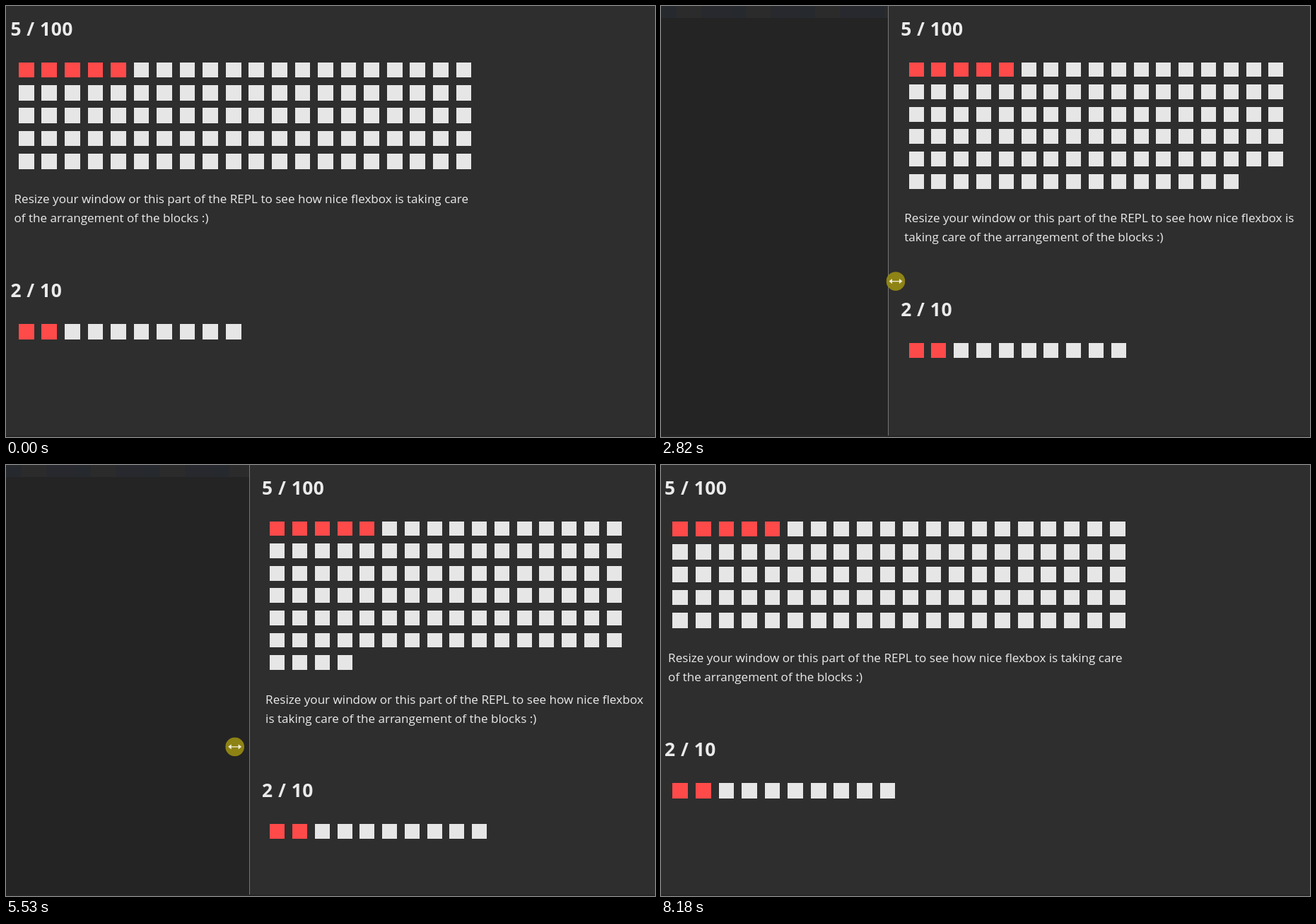
Write an HTML page that moves like this. It is 918 px wide and 610 px high and loops after 8780 ms.

```html
<!DOCTYPE html>
<html lang="en">
<head>
<meta charset="utf-8">
<title>Block counter</title>
<style>
  html, body { margin: 0; width: 100%; height: 100%; overflow: hidden; background: #2e2e2e; }
  #stage { position: relative; width: 918px; height: 610px; overflow: hidden; background: #2e2e2e;
    color: #ebebeb; font-family: "Open Sans", "Noto Sans", sans-serif; }
  #stage::after { content: ""; position: absolute; left: 0; right: 0; bottom: 0; height: 2px; background: #272727; }
  #editor { position: absolute; left: 0; top: 0; height: 610px; background: #242424; border-right: 1px solid #747474; }
  #editor::before { content: ""; display: block; height: 17px;
    background: repeating-linear-gradient(90deg, #26292d 0 22px, #2b2b2b 0 57px, #28292f 0 98px); }
  #view { position: absolute; top: 0; }
  h2 { margin: 0 0 9.2px -6px; font-size: 26.4px; line-height: 65px; letter-spacing: .5px; white-space: nowrap; }
  p { margin: 22.3px 0 57.8px -.9px; font-size: 17.08px; line-height: 27px; }
  .grid { display: flex; flex-wrap: wrap; }
  .grid i { flex: none; width: var(--size); height: var(--size); margin: 5.36px 5.45px; background: #e6e6e6; }
  .grid i.on { background: #ff4a4a; }
  #cursor { position: absolute; left: -13.5px; top: -13.5px; width: 27px; height: 27px; }
</style>
</head>
<body>
<div id="stage">
  <div id="view">
    <h2>5 / 100</h2>
    <div class="grid" data-on="5" data-all="100"></div>
    <p>Resize your window or this part of the REPL to see how nice flexbox is taking care of the arrangement of the blocks :)</p>
    <h2>2 / 10</h2>
    <div class="grid" data-on="2" data-all="10"></div>
  </div>
  <div id="editor"></div>
  <svg id="cursor" viewBox="-13.5 -13.5 27 27">
    <circle r="13.4" fill="#928714" fill-opacity=".96"/>
    <path d="M-7 0H7" stroke="#f0edd8" stroke-width="1.2"/>
    <path d="M-9.5 0l4.5-3.6v7.2zM9.5 0l-4.5-3.6v7.2z" fill="#f0edd8"/>
  </svg>
</div>
<script>
const LOOP = 8780, FRAME = 100, KEY_GAP = 400;
const $ = id => document.getElementById(id);
const view = $("view"), editor = $("editor"), cursor = $("cursor");
const text = view.querySelector("p");

for (const grid of view.querySelectorAll(".grid")) {
  for (let i = 0; i < +grid.dataset.all; i++) {
    const block = document.createElement("i");
    if (i < +grid.dataset.on) block.className = "on";
    grid.append(block);
  }
}

// spans in which the picture advances once per FRAME
const bursts = [[1100, 1900], [2020, 3920], [5130, 5930], [6030, 6550], [6850, 7850]];

// divider x every KEY_GAP ms; the pointer runs ahead by lead ms
const drags = [
  { start: 1100, lead: 50, xs: [-10.6, 57.5, 130, 192, 300, 374, 421, 437] },
  { start: 5130, lead: 90, xs: [437, 345, 248, 120, 88, 34, -1, -14.75] }
];

function snap(t) {
  const burst = bursts.findLast(b => t >= b[0]);
  if (!burst) return 0;
  const [first, last] = burst;
  return Math.min(last, first + Math.floor((t - first) / FRAME) * FRAME);
}

function along({ start, xs }, t) {
  const k = Math.max(0, Math.min(xs.length - 1, (t - start) / KEY_GAP));
  const i = Math.floor(k), a = xs[i], b = xs[i + 1] ?? a;
  return a + (b - a) * (k - i);
}

function draw(t) {
  const at = snap(t);
  const drag = at < drags[1].start ? drags[0] : drags[1];
  const x = along(drag, at);
  const cx = along(drag, at + drag.lead);
  const cy = 370 + 31 * (1 - Math.exp((drags[0].start - at) / 1800));

  // blocks and gaps shrink a little as the view narrows
  const shrink = (x + 11) * 0.0023;
  const room = Math.min(654, 881 - x);
  view.style.left = x + 23 + "px";
  view.style.width = room + "px";
  view.style.setProperty("--size", 21.7 - shrink + "px");
  text.style.width = room + 3 + "px";
  text.style.marginBottom = 57.8 - shrink * 1.4 + "px";

  const edge = Math.round(x) - 1;
  editor.style.display = edge < 0 ? "none" : "";
  editor.style.width = edge + "px";
  cursor.style.display = at ? "" : "none";
  cursor.style.transform = `translate(${cx}px, ${cy}px)`;
}

const start = performance.now();
function tick() {
  draw((performance.now() - start) % LOOP);
  requestAnimationFrame(tick);
}
tick();
</script>
</body>
</html>
```
